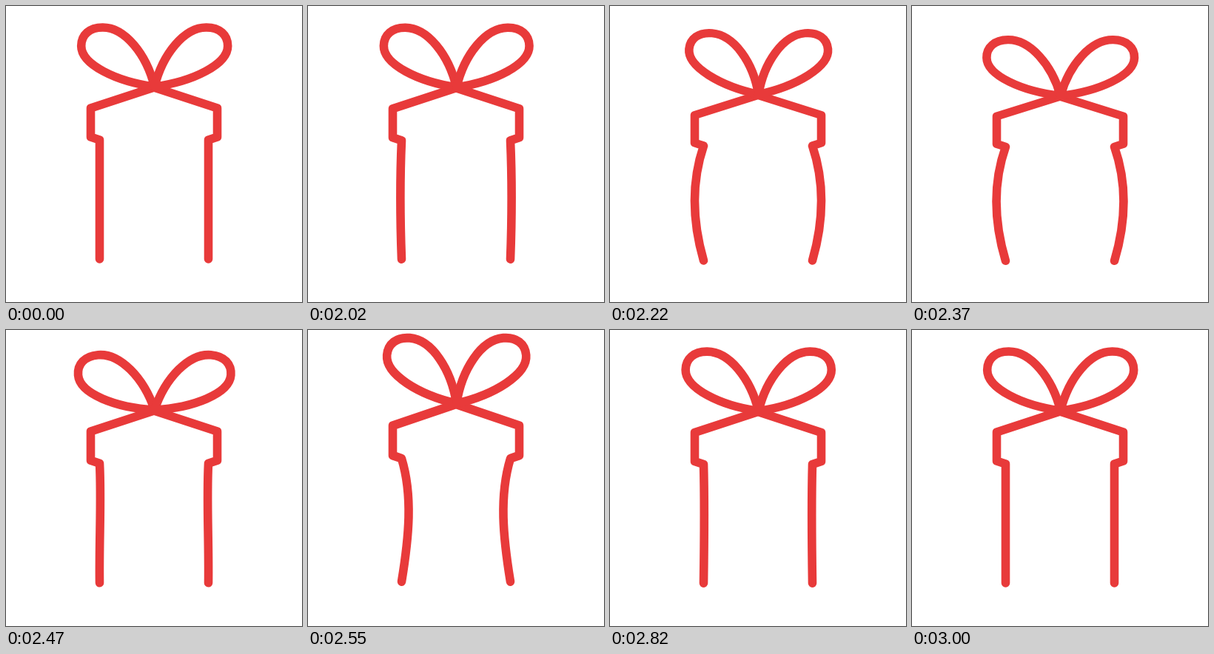
An HTML page for the animation above (3020 ms loop, 400 by 400 pixels).

```html
<!DOCTYPE html>
<html lang="en">
<head>
<meta charset="utf-8">
<title>Gift box</title>
<style>
  html, body { margin: 0; width: 100%; height: 100%; overflow: hidden; background: #fff; }
  svg { display: block; width: 100%; height: 100%; }
</style>
</head>
<body>
<svg viewBox="0 0 400 400">
  <g id="gift" fill="none" stroke="#e83a3a" stroke-width="11.6" stroke-linecap="round" stroke-linejoin="round">
    <path id="box"/>
    <path class="loop"/>
    <path class="loop"/>
  </g>
</svg>
<script>
const LOOP = 3020, HOLD = 2020, FLOOR = 400;

const linear = p => p;
const smooth = p => (1 - Math.cos(Math.PI * p)) / 2;
const settle = p => 1 - (1 - p) ** 2.5;

// Each key: time in ms, value, easing used to reach it
const stretch = [[2003, 1], [2220, 0.964, linear], [2350, 0.956, linear],
                 [2562, 1.034, smooth], [2690, 0.997, smooth], [2990, 1, smooth]];
const tilt = [[1990, 0], [2220, 5, linear], [2260, 5, linear], [2460, -5, smooth],
              [2560, 5, smooth], [2980, 0, settle]];
const bulgeTop = [[1990, 0], [2220, -16, linear], [2355, -17, linear],
                  [2560, 15.5, smooth], [2980, 0, settle]];
const bulgeLow = [[1990, 0], [2220, -16, linear], [2355, -17, linear],
                  [2560, 10, smooth], [2980, 0, settle]];

function valueAt(keys, t) {
  if (t < HOLD) return keys[0][1];
  const i = keys.findIndex(key => key[0] > t);
  if (i < 0) return keys[keys.length - 1][1];
  const [t0, v0] = keys[i - 1], [t1, v1, ease] = keys[i];
  return v0 + (v1 - v0) * ease((t - t0) / (t1 - t0));
}

const gift = document.getElementById("gift");
const box = document.getElementById("box");
const loops = document.querySelectorAll(".loop");

loops.forEach(loop => loop.setAttribute("d",
  "M0 0C-11-44-40-80-70-80C-88-80-99-70-99-55C-99-30-52-7 0 0"));

function halfBox(side, top, low) {
  const x = offset => 200 - side * offset;
  return `M200 110L${x(85.5)} 138V177L${x(73.5)} 181` +
    `C${x(73.5 - top)} 230 ${x(73.5 - low)} 284 ${x(73.5)} 342`;
}

function draw(t) {
  const top = valueAt(bulgeTop, t), low = valueAt(bulgeLow, t);
  const angle = valueAt(tilt, t), scale = valueAt(stretch, t);
  box.setAttribute("d", halfBox(1, top, low) + halfBox(-1, top, low));
  loops.forEach((loop, i) => loop.setAttribute("transform",
    `translate(200.7 109) scale(${i ? -1 : 1} 1) rotate(${angle})`));
  gift.setAttribute("transform", `translate(0 ${FLOOR * (1 - scale)}) scale(1 ${scale})`);
}

const start = performance.now();
function tick() {
  draw((performance.now() - start) % LOOP);
  requestAnimationFrame(tick);
}
tick();
</script>
</body>
</html>
```
